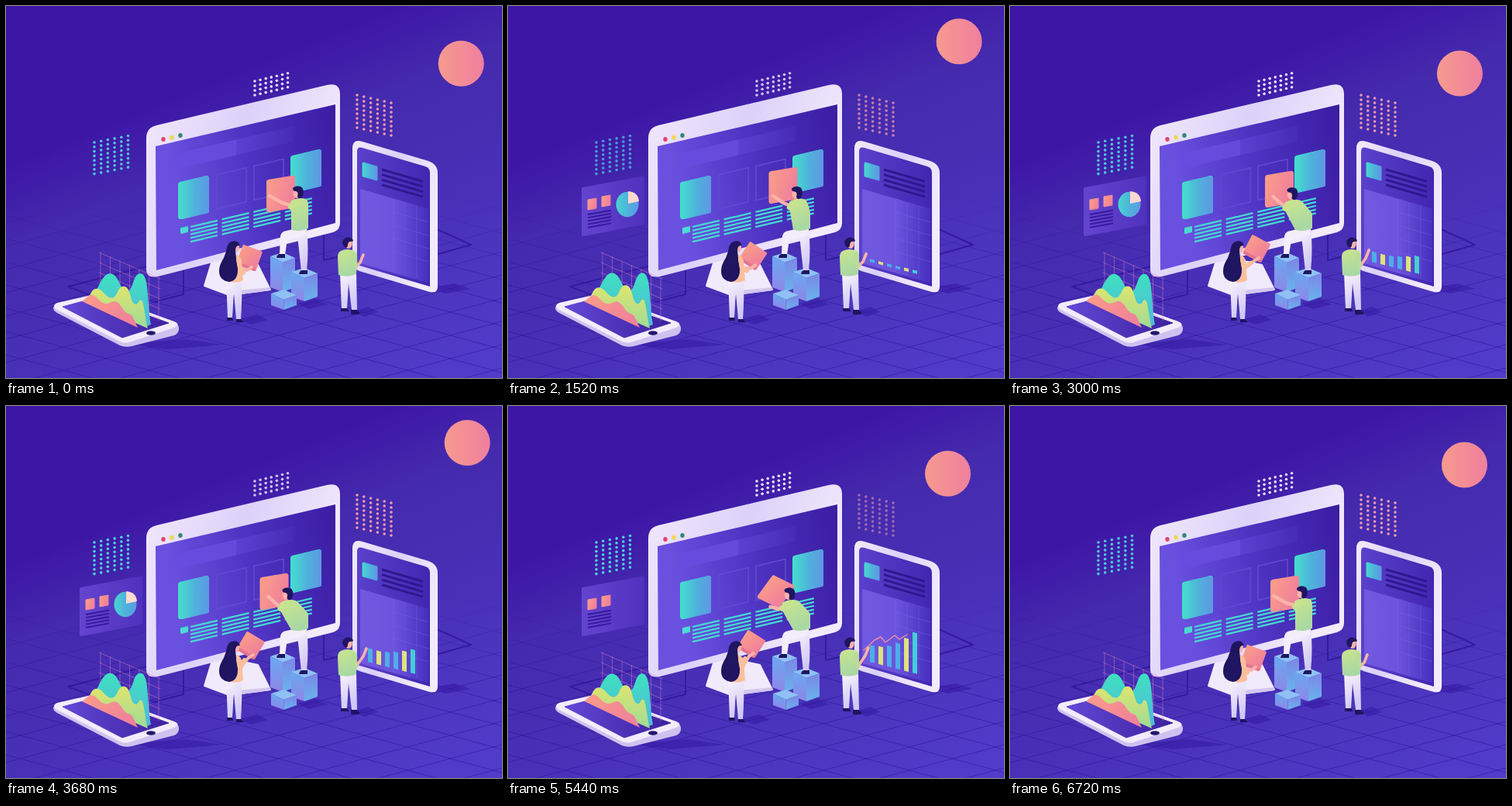
These frames come from a looping animation (640 by 480 pixels, 6.76 s). An HTML page:

```html
<!DOCTYPE html>
<html lang="en">
<head>
<meta charset="utf-8">
<title>Isometric workspace</title>
<style>
html, body { margin: 0; width: 100%; height: 100%; overflow: hidden; background: #4019a6; }
svg { display: block; width: 100%; height: 100%; }
</style>
</head>
<body>
<svg id="stage" viewBox="0 0 640 480"></svg>
<script>
const LOOP = 6760, TAU = Math.PI * 2;
const SKIN = '#fbb3aa', NAVY = '#1f1560';
const RISE = -.235, FALL = .29; // edge slopes of the monitor and the tablet
const stage = document.getElementById('stage');

// ---- markup helpers ----
const range = n => [...Array(n).keys()];
const each = (n, fn) => range(n).map(fn).join('');
const poly = (pts, fill, round = 0, more = '') =>
  `<polygon points="${pts}" fill="${fill}" ${round ? `stroke="${fill}" stroke-width="${round}" stroke-linejoin="round"` : ''} ${more}/>`;
const path = (d, fill, more = '') => `<path d="${d}" fill="${fill}" ${more}/>`;
const line = (d, color, width = 1, more = '') =>
  `<path d="${d}" fill="none" stroke="${color}" stroke-width="${width}" stroke-linecap="round" stroke-linejoin="round" ${more}/>`;
const oval = (x, y, rx, ry, fill) => `<ellipse cx="${x}" cy="${y}" rx="${rx}" ry="${ry}" fill="${fill}"/>`;
const group = (id, body) => `<g id="${id}">${body}</g>`;
const grad = (id, colors, x2 = 1, y2 = 0) =>
  `<linearGradient id="${id}" x2="${x2}" y2="${y2}">` +
  colors.map((c, i) => `<stop offset="${i / (colors.length - 1)}" stop-color="${c}"/>`).join('') +
  '</linearGradient>';
const dots = (id, cols, rows, x, y, dx, dy, skew, fill) => group(id,
  each(cols, i => each(rows, j => oval(x + i * dx, y + i * skew + j * dy, 1.8, 1.8, fill))));
const textLines = (x, y, w, slope, gap, color, width, n = 5) =>
  each(n, i => `<path d="M${x} ${y + i * gap}l${w} ${w * slope}" stroke="${color}" stroke-width="${width}"/>`);
// upright sheet with slanted top and bottom edges
const sheet = (x, y, w, h, slope, fill, round, more) =>
  poly([x, y, x + w, y + w * slope, x + w, y + w * slope + h, x, y + h], fill, round, more);

// ---- scenery ----
const defs = '<defs>' +
  '<linearGradient id="bg" gradientUnits="userSpaceOnUse" x1="0" y1="0" x2="261" y2="635">' +
  '<stop offset=".28" stop-color="#3e16a6"/><stop offset=".42" stop-color="#442aad"/>' +
  '<stop offset=".65" stop-color="#4831b7"/><stop offset="1" stop-color="#523dcb"/></linearGradient>' +
  grad('sunFill', ['#f79a8f', '#ef7f9e']) +
  grad('screen', ['#6a50df', '#4a30bd', '#3a1ba0'], 1, -.2) +
  grad('banner', ['#6046dc', '#5f45d4', '#472db6']) +
  grad('teal', ['#47d6d0', '#4fb2dc', '#5c9be2']) +
  grad('coral', ['#fb9d89', '#f0829a'], 1, .4) +
  grad('frame', ['#f3eafb', '#dcd2fa', '#f3ebfc'], 1, .4) +
  grad('tab', ['#7159df', '#6b53dd', '#4630bd']) +
  grad('tabBody', ['#5a41cc', '#4026b0']) +
  grad('panelFill', ['#6344cf', '#4f32bd']) +
  grad('phone', ['#6248d6', '#3d209f']) +
  grad('wave', ['#3fe0c0', '#4fb8dc'], 0, 1) +
  grad('lime', ['#dfe56f', '#9edb96'], 0, 1) +
  grad('shirt', ['#cbe58d', '#a9d8a4'], .3, 1) +
  grad('legs', ['#fbf5fd', '#cfc8f4'], .3, 1) +
  grad('blockL', ['#6aa9ef', '#8d86e8'], 0, 1) +
  grad('blockR', ['#7b86e6', '#69b4ec'], 0, 1) +
  grad('fade', ['#000', '#000', '#000', '#fff', '#fff'], 0, 1) +
  '<mask id="floorMask"><rect width="640" height="480" fill="url(#fade)"/></mask></defs>';

const shadow = (x, y, w) => poly([x, y, x + w * .6, y - 6, x + w, y + 1, x + w * .4, y + 7], '#3319a0', 0, 'opacity=".55"');

const floor = () => {
  const net = each(22, i => `M0 ${i * 30}L640 ${i * 30 + 173}M0 ${i * 30 + 190}L640 ${i * 30 + 17}`);
  return `<g mask="url(#floorMask)">${line(net, '#3419a2', 1, 'opacity=".65"')}</g>` +
    line('M558 320L600 308L545 283M185 335L80 362L116 376M229 340V372L190 382M410 290V328L448 319', '#351aa0', 2) +
    shadow(160, 436, 120) + shadow(545, 364, 55) + shadow(302, 404, 36) + shadow(375, 384, 40) + shadow(450, 394, 30);
};

const monitor = () => {
  const y = x => 227 + RISE * (x - 222);
  const card = x => sheet(x + 3, y(x) + 3, 34, 42, RISE, '#3fe0cb', 6) + sheet(x + 5, y(x) + 3, 32, 42, RISE, 'url(#teal)', 6);
  const slot = x => sheet(x + 2, y(x) + 2, 38, 44, RISE, 'none', 0, 'stroke="#6249d0" stroke-width="1.5" stroke-linejoin="round"');
  return poly('268,322 256,361 288,373 341,366 325,334', '#f1eafb', 2) +
    poly('288,374 341,367 341,363 300,367', '#d2c6f1') +
    path('M181 171Q181 157 194 154L414 102Q431 98 431 114V280Q431 289 422 292L196 349Q181 352 181 340Z', 'url(#frame)') +
    poly('193,181 425,127 425,280 194,341', 'url(#screen)') +
    ['#e5426a', '#efd84e', '#2f8a70'].map((c, i) => oval(203 + 11 * i, 172 - 2.5 * i, 2.7, 2.9, c)).join('') +
    sheet(218, 191, 153, 20, RISE, 'url(#banner)', 0, 'opacity=".8"') +
    sheet(218, 191, 79, 20, RISE, '#6b50e2', 0, 'opacity=".65"') +
    card(222) + slot(270) + slot(318) + card(367) +
    sheet(226, 287, 8, 6, RISE, '#49dcd0', 2) +
    each(4, i => textLines(238 + 40.6 * i, 285 + 40.6 * RISE * i, 35, RISE, 4.8, '#46d9d3', 2.3));
};

const tablet = () =>
  path('M447 184Q447 171 460 175L545 200Q557 204 557 216V362Q557 371 547 369L456 342Q447 339 447 331Z', 'url(#frame)') +
  path('M453 188Q453 181 460 183L541 207Q547 209 547 215V362L453 334Z', 'url(#tabBody)') +
  sheet(457, 236, 88, 96, FALL, 'url(#tab)') +
  line(each(3, i => `M${500 + 15 * i} ${250 + 4 * i}v93`) + each(4, i => `M500 ${266 + 17 * i}l45 13`), '#7b66e2', .8, 'opacity=".55"') +
  sheet(461, 203, 17, 16, FALL, 'url(#teal)', 3) +
  textLines(485, 211, 53, FALL, 6.6, '#2f178f', 3, 4) +
  each(6, i => `<polygon class="bar" fill="${i % 3 == 1 ? '#dce47b' : i < 5 ? '#4daee6' : '#45ced6'}"/>`) +
  line('M459 315L473 302L481 298L487 305L499 296L505 301L515 295', '#ee8ea8', 1.4, 'id="trend" pathLength="1" stroke-dasharray="1 2"');

const phone = () =>
  path('M66 385L110 375Q116 373 122 375L217 409Q223 411 223 415V418Q222 423 217 425L162 439Q154 441 147 438L66 396Q61 393 61 390Q61 387 66 385Z', '#cfc2f1') +
  path('M66 383L110 373Q116 371 122 373L217 407Q226 411 217 415L162 433Q154 436 147 433L66 392Q58 387 66 383Z', '#f3ecfc') +
  poly('73,388 118,376 210,409 150,428', 'url(#phone)', 1) +
  oval(187, 422, 6, 2.8, '#22166c') +
  line(each(7, i => `M${122 + i * 12.5} ${318 + i * 5.5}v55`) + each(5, i => `M120 ${318 + i * 13}l79 34`), '#d87fc7', .8, 'opacity=".6"') +
  group('waveBack', path('M106 378C118 374 122 345 134 345S147 368 156 368S163 344 174 345S182 385 187 411L180 414Z', 'url(#wave)')) +
  group('waveMid', path('M102 380C109 376 109 364 117 364S129 377 137 376S143 361 152 361S160 382 166 384S170 379 174 379S179 400 183 416Z', 'url(#lime)')) +
  group('waveFront', path('M98 381C104 377 107 372 112 373S121 383 128 384S137 379 143 382S152 396 158 397S166 407 170 415Z', 'url(#coral)'));

const block = (x, y, w, h) =>
  poly([x, y, x + w / 2, y - 5, x + w, y + 2, x + w / 2, y + 8], '#8fc0f6') +
  poly([x, y, x + w / 2, y + 8, x + w / 2, y + h + 6, x, y + h], 'url(#blockL)') +
  poly([x + w / 2, y + 8, x + w, y + 2, x + w, y + h, x + w / 2, y + h + 6], 'url(#blockR)');
const blocks = () => block(341, 323, 32, 40) + block(368, 343, 34, 32) + block(342, 371, 33, 15);

const woman = () =>
  group('gem', poly('-12,-12 12,-12 12,12 -12,12', 'url(#coral)', 3) + poly('-13,10 13,10 12,14 -12,14', '#e4738f')) +
  line('', SKIN, 4, 'id="womanArm"') +
  path('M284 352L304 352Q305 380 303 404H297L294 370L292 402H286Z', 'url(#legs)') +
  path('M285 402H292L293 406H285ZM297 404H303L307 408H297Z', NAVY) +
  path('M290 322Q300 318 304 328L306 354Q297 359 286 355Z', '#fac09d') +
  oval(296, 312, 5, 6.5, SKIN) +
  path('M291 304Q299 301 302 309Q296 308 296 316Q297 328 299 338Q300 354 288 356Q275 354 275 342Q275 334 281 325Q284 318 285 312Q286 306 291 304Z', NAVY) +
  line('', '#fac09d', 6, 'id="womanSleeve"');

const builder = () =>
  group('card', sheet(-15, -15, 31, 36, -.17, 'url(#coral)', 6)) +
  path('M374 288L388 287Q391 314 388 342H381L377 305Z', 'url(#legs)') +
  path('M384 285L387 295Q374 300 363 302L360 321H353L354 297Q355 291 362 290Z', '#f4edfb') +
  path('M352 320H360V325H349Q349 322 352 320ZM381 341H389V346H378Q378 343 381 341Z', NAVY) +
  path('', 'url(#shirt)', 'id="torso"') +
  line('', SKIN, 4.5, 'id="builderArm"') +
  line('', '#c7e390', 8, 'id="builderSleeve"') +
  group('head', oval(-2, 1, 4.5, 6, SKIN) +
    path('M-7 -6Q-2 -11 5 -7Q9 -1 5 6Q1 9 -1 5Q1 -1 -3 -2Q-7 -2 -7 -6Z', NAVY));

const watcher = () =>
  path('M431 344H452L453 392H446L442 358L440 391H433Z', 'url(#legs)') +
  path('M432 390H440L443 394H432ZM445 392H452L457 396L455 398H445Z', NAVY) +
  oval(442, 306, 4.8, 7, SKIN) +
  path('M435 302Q440 296 446 300Q449 302 447 304Q441 303 441 309Q440 314 436 310Q433 306 435 302Z', NAVY) +
  path('M432 316Q440 312 450 316Q454 319 453 327L452 346Q440 351 429 347L428 324Q428 318 432 316Z', 'url(#shirt)') +
  line('', SKIN, 3.6, 'id="watcherArm"') +
  line('M449 322L451 335', '#b8dd96', 6);

const panel = () => group('panel',
  sheet(97, 236, 77, 59, -.19, 'url(#panelFill)', 4) +
  sheet(103, 250, 11, 13, -.18, 'url(#coral)', 1) +
  sheet(121, 246, 11, 13, -.18, 'url(#coral)', 1) +
  textLines(103, 269, 30, -.18, 4.2, '#33189a', 1.8) +
  group('pie', oval(0, 0, 14.5, 16.3, 'url(#teal)') + path('M1 -1V-17Q14 -16 15 -4Z', '#ffd9d1')));

stage.innerHTML = defs + '<rect width="640" height="480" fill="url(#bg)"/>' + floor() +
  group('sun', oval(0, 0, 29.5, 29.5, 'url(#sunFill)')) +
  dots('dotsTop', 7, 4, 321, 97, 7.1, 6, -1.7, '#efe3fb') +
  dots('dotsLeft', 6, 8, 114, 176, 8.7, 5.8, -1.7, '#4ed3df') +
  dots('dotsRight', 6, 8, 453, 115, 8.8, 6, 2, '#f49bae') +
  panel() + monitor() + tablet() + phone() + blocks() + woman() + builder() + watcher();

// ---- motion ----
const clamp = u => Math.max(0, Math.min(1, u));
const ease = u => u * u * (3 - 2 * u);
const ramp = (t, a, b) => clamp((t - a) / (b - a));
// eases in from a to b, holds, eases out from c to d
const pulse = (t, a, b, c, d) => ease(ramp(t, a, b)) - ease(ramp(t, c, d));
// cosine with its crest at the given time, `turns` times per loop
const swing = (t, crest, turns = 1) => Math.cos(TAU * turns * (t - crest) / LOOP);
const dip = (t, low, turns, depth) => 1 - depth * ((1 + swing(t, low, turns)) / 2) ** 3;

const el = {};
stage.querySelectorAll('[id]').forEach(n => el[n.id] = n);
const barEls = stage.querySelectorAll('.bar');
const set = (id, key, value) => el[id].setAttribute(key, value);
const place = (id, x, y, turn = 0, size = 1) =>
  set(id, 'transform', `translate(${x} ${y}) rotate(${turn}) scale(${size})`);

function drawSky(t) {
  // two rounds of an ellipse, the first a little late and the second early
  const a = 2 * TAU * (t - 910 - 175 * swing(t, 1150)) / LOOP;
  place('sun', 581.5 + 14 * Math.cos(a + .7), 66 - 30 * Math.cos(a));
  set('dotsTop', 'opacity', dip(t, 900, 2, .45));
  set('dotsLeft', 'opacity', dip(t, 1500, 1, .3));
  set('dotsRight', 'opacity', dip(t, 2000, 2, .45));
}

function drawPeople(t) {
  const lean = pulse(t, 400, 3500, 5600, 6650);
  const lift = pulse(t, 0, 800, 2000, 3600);
  const spin = pulse(t, 4500, 5400, 5700, 6500);
  const raise = pulse(t, 600, 4500, 5600, 6650);

  const cx = 354 - 8.5 * lean + 3 * lift, cy = 242 - 10 * lift - 3 * lean;
  place('card', cx, cy, 36 * spin, 1 - .14 * spin);
  const hx = 377 - 13.5 * lean, hy = 241 + 2 * lean;
  const ax = cx - 14 + 7 * lean, ay = cy + 3 + 10 * lift + 4 * lean + 13 * spin;
  place('head', hx, hy);
  set('torso', 'd', `M${hx - 10} ${hy + 11}Q${hx} ${hy + 5} ${hx + 10} ${hy + 8}Q${hx + 14} ${hy + 10} 390 268V287Q380 292 368 289L${hx - 9} 265Z`);
  set('builderArm', 'd', `M${hx - 6} ${hy + 17}L${(hx + ax) / 2 - 2} ${(hy + ay) / 2 + 11}L${ax} ${ay}`);
  set('builderSleeve', 'd', `M${hx - 1} ${hy + 13}l-8 5`);

  const gx = 314 + 5 * Math.sin(Math.PI * raise), gy = 325 - 18 * raise;
  place('gem', gx, gy, 20 + 12 * raise + 20 * pulse(t, 100, 800, 1000, 2200));
  set('womanArm', 'd', `M302 338L${gx - 3} ${gy + 16}l6 -4`);
  set('womanSleeve', 'd', `M300 327L302 338L${gx - 8} ${gy + 19}`);

  const px = 461 + 4 * lean - 6 * pulse(t, 1500, 2280, 2400, 3300), py = 321 - 9 * raise;
  set('watcherArm', 'd', `M451 337L${px - 4} ${py + 10}L${px} ${py}`);
}

function drawCharts(t) {
  const show = pulse(t, 150, 640, 5450, 6000);
  set('panel', 'opacity', show);
  set('panel', 'transform', `translate(136 258) scale(${.85 + .15 * show}) translate(-136 -258)`);
  place('pie', 154, 256, 0, pulse(t, 880, 1400, 4840, 5300));

  // later bars are taller and finish later
  const clear = 1 - ease(ramp(t, 5600, 6300));
  barEls.forEach((bar, i) => {
    const x = 470 + 11 * i, base = 331 + 2.8 * i;
    const h = (22 + 1.28 * i * i) * ramp(t, 900 + 60 * i, 4300 + 250 * i) * clear;
    bar.setAttribute('points', [x - 3, base - h - .8, x + 3, base - h + .8, x + 3, base + .8, x - 3, base - .8]);
    bar.setAttribute('opacity', clamp(h / 3));
  });
  const trend = pulse(t, 4560, 5360, 5600, 6000);
  set('trend', 'stroke-dashoffset', 1 - trend);
  set('trend', 'opacity', clamp(trend * 20));

  ['waveBack', 'waveMid', 'waveFront'].forEach((id, i) =>
    set(id, 'transform', `translate(0 412) scale(1 ${1 + .015 * swing(t, 1000 + 800 * i, 2)}) translate(0 -412)`));
}

function draw(t) {
  drawSky(t);
  drawPeople(t);
  drawCharts(t);
}

const start = performance.now();
function tick() {
  draw((performance.now() - start) % LOOP);
  requestAnimationFrame(tick);
}
draw(0);
requestAnimationFrame(tick);
</script>
</body>
</html>
```
